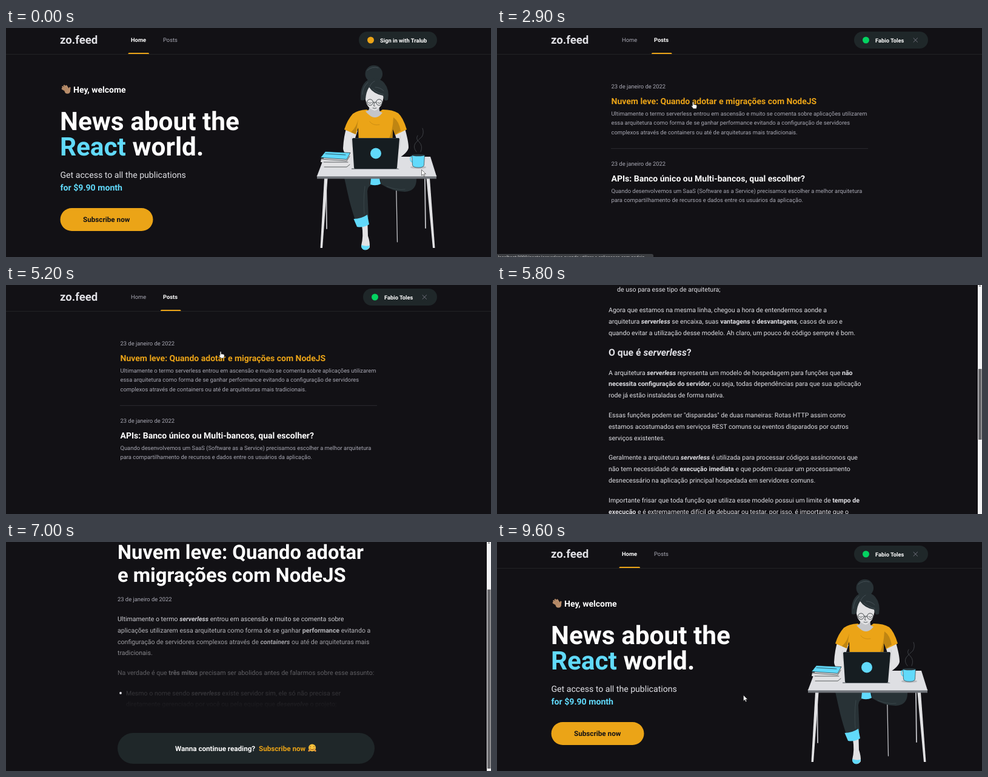
Write an HTML page that moves like this. It is 800x379 px and loops after 9.7 s.

```html
<!DOCTYPE html>
<html lang="pt">
<head>
<meta charset="utf-8">
<title>News site tour</title>
<style>
  html, body { margin: 0; width: 100%; height: 100%; overflow: hidden; background: #121115; }
  svg { display: block; width: 800px; height: 379px; }
  text { font-family: Roboto, "Liberation Sans", sans-serif; text-rendering: geometricPrecision; white-space: pre; }
  .b { font-weight: 700; }
  .bi { font-weight: 700; font-style: italic; }
</style>
</head>
<body>
<svg id="stage" viewBox="0 0 800 379"></svg>
<script>
const BG = '#121115', WHITE = '#fff', SOFT = '#e1e1e6', GREY = '#a8a8b3';
const ORANGE = '#eba417', CYAN = '#61dafb', PANEL = '#1f2729', GREEN = '#04d361';
const LOOP = 9700, STEP = 100, VIEW = 379;

// _x_ is bold italic, *x* is bold
const rich = s => s
  .replace(/_([^_]+)_/g, '<tspan class="bi">$1</tspan>')
  .replace(/\*([^*]+)\*/g, '<tspan class="b">$1</tspan>');
const text = (x, y, size, s, fill = SOFT, cls = '', id = '') =>
  `<text x="${x}" y="${y}" font-size="${size}" fill="${fill}" class="${cls}" id="${id}">${rich(s)}</text>`;
const bold = (x, y, size, s, fill = WHITE, id = '') => text(x, y, size, s, fill, 'b', id);
const path = (d, fill, extra = '') => `<path d="${d}" fill="${fill}" ${extra}/>`;
const line = (d, color, width = 1) =>
  path(d, 'none', `stroke="${color}" stroke-width="${width}" stroke-linecap="round" stroke-linejoin="round"`);
const group = (id, ...parts) => `<g id="${id}">${parts.join('')}</g>`;
const pill = (x, y, w, h, fill, id = '') =>
  `<rect x="${x}" y="${y}" width="${w}" height="${h}" rx="${h / 2}" fill="${fill}" id="${id}"/>`;
const dot = (x, y, r, fill) => `<circle cx="${x}" cy="${y}" r="${r}" fill="${fill}"/>`;

const TITLE = ['Nuvem leve: Quando adotar', 'e migrações com NodeJS'];
const DATE = '23 de janeiro de 2022';

function header() {
  return group('header',
    '<rect x="-5" y="43" width="810" height="1" fill="#232326"/>',
    bold(89, 25.5, 18.6, 'zo.feed', SOFT),
    group('navHome',
      bold(206, 23.4, 9.35, 'Home'), text(259, 23.4, 9.35, 'Posts', GREY),
      path('M201.500 43v-.5q0-1.500 1.500-1.500h31.500q1.500 0 1.500 1.500v.5z', ORANGE)),
    group('navPosts',
      text(206, 23.4, 9.35, 'Home', GREY), bold(259, 23.4, 9.35, 'Posts'),
      path('M255 43v-.5q0-1.500 1.500-1.500h30.500q1.500 0 1.500 1.500v.5z', ORANGE)),
    group('signedOut',
      pill(582, 6, 129, 28, PANEL), dot(601.5, 20, 5.5, ORANGE),
      bold(617, 23.6, 9.3, 'Sign in with Tralub')),
    group('signedIn',
      pill(589, 6, 122, 28, PANEL), dot(608.5, 20, 5.5, GREEN),
      bold(624, 23.6, 9.3, 'Fabio Toles'),
      line('M687 16.700l6.600 6.600M693.600 16.700l-6.600 6.600', '#737380')));
}

function wavingHand() {
  const skin = '#b88d6a';
  return line('M99 104l-6-3.500M100 102.500l-6.500-5M101 101.500l-5-6M103 101.500l-3.500-5.500', skin, 2.7) +
    line('M104.500 104.500l.8-5.500', skin, 2.5) + dot(101.3, 104, 4.8, skin) +
    line('M98 104.500l-4-2.600M99.500 103l-4-3.600M101.300 102l-3-3.800', '#8f6a4c', .4);
}

function woman() {
  const dark = '#283236', ink = '#1a2124', skin = '#e2e2e4', shade = '#c4c5c9', ochre = '#bf8512';
  return [
    // table and chair legs
    line('M643.500 250l2 104', shade, 1.3),
    line('M528 250l1 82M691 250l1 81', shade, 1.8),
    path('M525 249h5.500l-8.500 115h-3.500z', skin), path('M693.500 249h5.500l8.500 115h-3.500z', skin),
    // legs and foot
    path('M587 327l9.500-1 .5 18q3.500 10 3 19-3 5-8 4-6-1-6-7 4-16 1-33z', skin),
    path('M586 359q6 3 14 1-1 7-8 7.500-6-.5-6-8.500z', CYAN),
    path('M558 248h64l-20 12q-5 2-6 10l2 44-22 4q-8-24-12-43z', dark),
    path('M618 248h59q1 22-19 23-20 0-40-13z', dark),
    path('M602 249h14l2 9q-8 4-17 1z', CYAN),
    path('M573.500 316q12 0 22.500-7l3 16q-10 6-20 4z', CYAN),
    line('M592 262q-3 22-1 46M628 262q16 7 30 5', '#465257', .6),
    // arms
    path('M562 164l18 6q-8 22-7 31l5 11-6 6q-16-10-16-19 1-20 6-35z', skin),
    path('M640 170l17-7q7 24 7 35-1 8-17 18l-6-5q7-10 6-17z', skin),
    line('M573 200q-5-12-3-20M648 200q4-10 2-22', shade, .7),
    // shirt with shaded sides
    path('M595 135q-15 1-23 7-9 10-14 26l19 8 4-11 1 30h55l1-28 4 10 19-9q-6-20-14-27-9-6-26-6-11 10-26 0z', ORANGE),
    path('M581 151l-4 25-8-3.500q9-8 12-21.500zM639 148q9 6 12 22l-9 6-4-9-1 18h-6q7-15 8-37z', ochre),
    line('M600 155q5 7 16 5', ochre, .7),
    // head
    path('M599 126h16l1 11q2 3 5 3-12 17-28-2 6-1 6-5z', shade),
    path('M592 100q14-9 31 0 1 18-4 28-6 8-11 9-9-3-13-11-4-12-3-26z', skin),
    dot(606.8, 76, 14.3, dark),
    path('M585 119q-2-28 16-35 14-3 23 7 9 11 6 28-4 2-6 0l-2-7q-16-3-23-14-5 7-6 20-4 3-8 1z', dark),
    line('M600 97q2-6 8-9M605 101q10 8 18 9M609 98q8 0 14 6M596 70q8-7 18-4M588 110q0-12 9-20', '#566268', .6),
    '<g fill="none" stroke="#1a2124" stroke-width=".8"><circle cx="600.5" cy="123" r="5"/><circle cx="615.5" cy="123" r="5"/></g>',
    line('M597.500 123.500q3 2.500 5.500 0M613 123.500q3 2.500 5.500 0M605.500 123h5M608 123l-1.500 6h2M605 132.500q3 1.500 6 0', ink, .7),
    // table top
    path('M525 213h175l10 32H513z', '#dedfe3'), path('M513 245h197v4.500H513z', '#70747a'),
    line('M513 245h197', '#f4f4f6', .8),
    // books
    path('M524 219h43l1 9-6 4h-37q-4-6-1-13z', skin), path('M520 216l42 1 6-8v6l-6 9-43-2z', skin),
    path('M527 204.500l41 2-6 11-43-3z', CYAN),
    line('M519 217l43 3 5-8M524 222h40M525 230h37l5-4M527 204.500l41 2-6 11-43-3zM527 208l33 2', ink, .7),
    // laptop
    path('M570 232h76l3 2h-79z', '#8b9096'),
    path('M574 182h73q2 0 2 2l-4 47q0 2-2 2h-67q-2 0-2-2l-3-47q0-2 3-2z', '#161d21'),
    line('M574 182.500h73', '#39464c', .8), dot(610, 207.5, 9, CYAN),
    // mug and steam
    '<ellipse cx="680" cy="230.500" rx="13" ry="2.500" fill="#b9bbc0"/>',
    line('M671 213q-4-1-4 3 0 6 5 6', CYAN, 2),
    path('M669.500 210h21l-1 17q-1 4-9 4-9 0-10-4z', CYAN, `stroke="${ink}" stroke-width=".6"`),
    '<ellipse cx="680" cy="210.500" rx="10.500" ry="1.800" fill="#27363c"/>',
    line('M677 205q-6-7-2-14 6-7 11-11 4-7 1-14M684 205q4-9-2-16-7-5-3-11', '#5c6065', .6)
  ].join('');
}

function home() {
  return group('home',
    wavingHand(), bold(111, 107, 14, 'Hey, welcome'),
    bold(89, 169, 42.3, 'News about the'),
    bold(89, 211.2, 42.3, '<tspan fill="' + CYAN + '">React</tspan> world.'),
    text(89.5, 248, 14.12, 'Get access to all the publications'),
    bold(89.5, 269, 14.12, 'for $9.90 month', CYAN),
    group('subscribe', pill(89.5, 298, 153, 38, ORANGE), bold(127, 321.3, 11.7, 'Subscribe now', BG)),
    woman());
}

function posts() {
  const item = (y, id, title, lines) =>
    text(188.5, y, 9.4, DATE, GREY) + bold(188.5, y + 26, 14, title, WHITE, id) +
    lines.map((s, i) => text(188.5, y + 45.5 + i * 15.4, 9.4, s, GREY)).join('');
  return group('posts',
    item(99.5, 'first', TITLE.join(' '), [
      'Ultimamente o termo serverless entrou em ascensão e muito se comenta sobre aplicações utilizarem',
      'essa arquitetura como forma de se ganhar performance evitando a configuração de servidores',
      'complexos através de containers ou até de arquiteturas mais tradicionais.']),
    '<rect x="188" y="199" width="424" height="1" fill="#29292e"/>',
    item(227.5, 'second', 'APIs: Banco único ou Multi-bancos, qual escolher?', [
      'Quando desenvolvemos um SaaS (Software as a Service) precisamos escolher a melhor arquitetura',
      'para compartilhamento de recursos e dados entre os usuários da aplicação.']));
}

function article() {
  const LH = 18.75;
  const para = (y, lines, x = 184) =>
    lines.map((s, i) => text(x, y + i * LH, 10.59, s)).join('');
  const bullet = y => dot(189, y - 3.5, 1.9, SOFT);
  return group('article',
    bold(184, 125.6, 32.7, TITLE[0]), bold(184, 164.3, 32.7, TITLE[1]),
    text(184, 195.5, 9.4, DATE, GREY),
    para(229, [
      'Ultimamente o termo _serverless_ entrou em ascensão e muito se comenta sobre',
      'aplicações utilizarem essa arquitetura como forma de se ganhar *performance* evitando a',
      'configuração de servidores complexos através de _containers_ ou até de arquiteturas mais',
      'tradicionais.']),
    para(318, ['Na verdade é que *três mitos* precisam ser abolidos antes de falarmos sobre esse assunto:']),
    para(351.5, [
      'Mesmo o nome sendo _serverless_ existe servidor sim, ele só não precisa ser',
      'diretamente gerenciado por você ou pela equipe que _desenvolve_ o projeto;'], 198),
    group('full',
      para(393.6, [
        'Nem sempre os custos serão menores, isso depende muito do volume e',
        'da forma como cada função é executada;'], 198),
      para(435.7, ['Não serve para toda aplicação, existem bons e maus casos', 'de uso para esse tipo de arquitetura;'], 198),
      bullet(393.6), bullet(435.7),
      para(488, [
        'Agora que estamos na mesma linha, chegou a hora de entendermos aonde a',
        'arquitetura _serverless_ se encaixa, suas *vantagens* e *desvantagens*, casos de uso e',
        'quando evitar a utilização desse modelo. Ah claro, um pouco de código sempre é bom.']),
      bold(184, 560, 15.75, 'O que é _serverless_?', SOFT),
      para(591.5, [
        'A arquitetura _serverless_ representa um modelo de hospedagem para funções que *não*',
        '*necessita configuração do servidor*, ou seja, todas dependências para que sua aplicação',
        'rode já estão instaladas de forma nativa.']),
      para(662, [
        'Essas funções podem ser "disparadas" de duas maneiras: Rotas HTTP assim como',
        'estamos acostumados em serviços REST comuns ou eventos disparados por outros',
        'serviços existentes.']),
      para(732.3, [
        'Geralmente a arquitetura _serverless_ é utilizada para processar códigos assíncronos que',
        'não tem necessidade de *execução imediata* e que podem causar um processamento',
        'desnecessário na aplicação principal hospedada em servidores comuns.']),
      para(802.8, [
        'Importante frisar que toda função que utiliza esse modelo possui um limite de *tempo de*',
        '*execução* e é extremamente difícil de debugar ou testar, por isso, é importante que o'])),
    group('preview',
      '<rect x="180" y="212" width="440" height="166" fill="url(#fade)"/>',
      pill(184, 414, 424, 51, PANEL),
      bold(279, 443.5, 11.65, 'Wanna continue reading?'),
      bold(417, 443.5, 11.65, 'Subscribe now', ORANGE),
      dot(505, 438.5, 6, '#f9c23c'),
      line('M502 437v-.8M508 437v-.8M501.500 440q3.500 4 7 0', '#6b4410', 1),
      line('M499.800 443.500l2.200-1.800M510.200 443.500l-2.200-1.800', '#e8973a', 2.8)),
    bullet(351.5));
}

const $ = id => document.getElementById(id);
$('stage').innerHTML =
  `<defs><linearGradient id="fade" gradientUnits="userSpaceOnUse" x1="0" y1="212" x2="0" y2="375">
    <stop stop-color="${BG}" stop-opacity="0"/><stop offset="1" stop-color="${BG}"/></linearGradient></defs>
  <rect width="800" height="379" fill="${BG}"/>` +
  home() + posts() + article() + header() +
  group('scrollbar', '<rect x="793" width="7" height="379" fill="#f3f3f5"/>',
    path('M794.500 2.500l2-2.500 2 2.500z', '#777'), '<rect id="thumb" x="794" width="5.500" fill="#68686b"/>') +
  group('status', path('M0 374h255q3 0 3 3v2H0z', '#3b3d41', 'id="statusBox"'), text(1.5, 382, 7.4, '', '#d5d6d9', '', 'statusText')) +
  group('cursor',
    path('M0 0v9.600l2.200-2 1.500 3.400 1.600-.7-1.500-3.300h3.100z', WHITE, 'id="arrow" stroke="#222" stroke-width=".6"'),
    path('M-.9.700q.9-1.200 1.800 0v3.500q3-.2 4.600.9.800.6.600 2.500l-.8 3.300h-5l-2.900-4q.2-1.500 1.700-.2z', WHITE, 'id="hand" stroke="#222" stroke-width=".5"'));

// start time, page, signed in
const SCENES = [
  [0, 'home', 0], [1400, 'home', 1], [2300, 'posts', 1], [5300, 'full', 1], [6400, 'home', 0],
  [6600, 'posts', 0], [6800, 'preview', 0], [7700, 'home', 0], [9000, 'home', 1]];
const HEIGHT = { full: 1207, preview: 477 };
const TRACK = { top: 2, size: 373 };
const SCROLL = [[5300, 0], [5800, 443], [5900, 443], [6200, 0], [6800, 0], [7000, 98], [7200, 98], [7500, 0]];
const POINTER = [
  [0, 685.5, 234.5], [100, 685, 230], [700, 650, 23], [1400, 650, 23], [1900, 271, 20], [2300, 272, 22],
  [2600, 300, 90], [2900, 323.5, 122.5], [3100, 324, 124], [3700, 350, 247], [4300, 380, 244],
  [5000, 354, 110], [5200, 354, 110], [6100, 720, 70], [6300, 689, 20], [6400, 689, 20], [6500, 271, 22],
  [6600, 271, 22], [6700, 300, 117], [7300, 420, 160], [7600, 211, 17], [7800, 211, 17],
  [8100, 190, 110], [8300, 200, 317], [9400, 226, 316], [9600, 406.5, 253.5]];
const STATUS = [
  [1900, 2300, 80, 'localhost:3000/posts'],
  [2800, 3000, 258, 'localhost:3000/posts/serverless-quando-utilizar-e-aplicacoes-com-nodejs']];
const HIDDEN = [[5300, 6100], [6800, 7300]];

const ease = k => k * k * (3 - 2 * k);
function at(keys, t) {
  const n = keys.findIndex(k => k[0] > t);
  if (n < 0) return keys[keys.length - 1].slice(1);
  if (n === 0) return keys[0].slice(1);
  const a = keys[n - 1], b = keys[n], k = ease((t - a[0]) / (b[0] - a[0]));
  return a.slice(1).map((v, i) => v + (b[i + 1] - v) * k);
}

function hit(page, user, x, y) {
  const zones = [['nav', 201, 0, 236, 43], ['nav', 255, 0, 288, 43],
    user ? ['user', 684, 14, 697, 27] : ['user', 582, 6, 711, 34]];
  if (page === 'home') zones.push(['subscribe', 90, 298, 242, 336]);
  if (page === 'posts') zones.push(['first', 188, 107, 527, 180], ['second', 188, 235, 513, 295]);
  const z = zones.find(([, l, top, r, b]) => x >= l && x <= r && y >= top && y <= b);
  return z ? z[0] : '';
}

const show = (id, on) => { $(id).style.display = on ? '' : 'none'; };
const inside = t => ([a, b]) => t >= a && t < b;

function draw(t) {
  const [, page, user] = SCENES.filter(s => s[0] <= t).pop();
  const height = HEIGHT[page], long = !!height;
  const scroll = long ? at(SCROLL, t)[0] : 0;
  const [x, y] = at(POINTER, t);
  const over = hit(page, user, x, y);

  show('home', page === 'home');
  show('posts', page === 'posts');
  show('article', long);
  show('full', page === 'full');
  show('preview', page === 'preview');
  show('navHome', page === 'home');
  show('navPosts', page !== 'home');
  show('signedIn', user);
  show('signedOut', !user);
  $('article').setAttribute('transform', `translate(0 ${-scroll})`);
  $('header').setAttribute('transform', `translate(${long ? -4 : 0} ${-scroll})`);

  show('scrollbar', long);
  if (long) {
    $('thumb').setAttribute('y', TRACK.top + scroll * TRACK.size / height);
    $('thumb').setAttribute('height', VIEW * TRACK.size / height);
  }
  for (const id of ['first', 'second']) $(id).setAttribute('fill', over === id ? ORANGE : WHITE);
  $('subscribe').style.filter = over === 'subscribe' ? 'brightness(.85)' : '';

  const status = STATUS.find(inside(t));
  show('status', status);
  if (status) {
    $('statusBox').setAttribute('d', `M0 374h${status[2] - 3}q3 0 3 3v2H0z`);
    $('statusText').textContent = status[3];
  }
  show('cursor', !HIDDEN.some(inside(t)));
  show('arrow', !over);
  show('hand', over);
  $('cursor').setAttribute('transform', `translate(${x} ${y})`);
}

const start = performance.now();
function tick() {
  const t = (performance.now() - start) % LOOP;
  draw(Math.floor(t / STEP) * STEP);
  requestAnimationFrame(tick);
}
tick();
</script>
</body>
</html>
```
